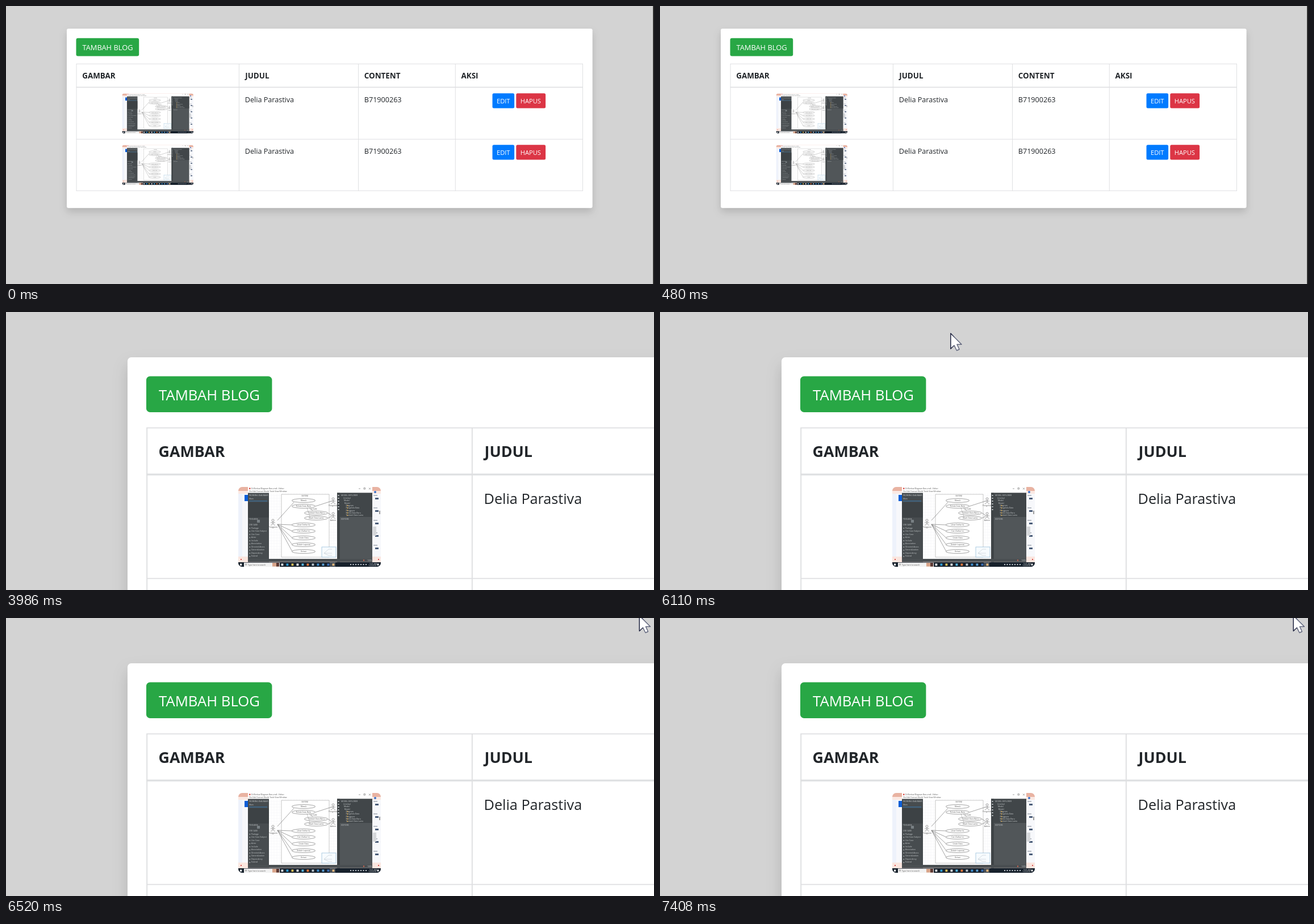
These frames come from a looping animation (1141x491 px, 8000 ms). An HTML page:

```html
<!DOCTYPE html>
<html lang="id">
<head>
<meta charset="utf-8">
<title>Blog</title>
<style>
  html, body { margin: 0; width: 100%; height: 100%; overflow: hidden; background: #d3d3d3; }
  svg { display: block; width: 1141px; height: 491px; }
  text { font-family: "Open Sans", "Noto Sans", sans-serif; fill: #212529; white-space: pre; }
  .th { font-size: 13.4px; font-weight: 700; }
  .td { font-size: 12.6px; }
  .btn { font-size: 12.85px; fill: #fff; }
  .sm { font-size: 11.1px; fill: #fff; }
  .tiny { font-size: 3.4px; fill: #555; }
  .light { fill: #c9cdcf; }
  .mid { text-anchor: middle; }
  .ink { fill: none; stroke: #666; stroke-width: .6; }
</style>
</head>
<body>
<svg viewBox="0 0 1141 491">
  <defs>
    <filter id="shadow" x="-5%" y="-15%" width="110%" height="135%">
      <feDropShadow dx="0" dy="6.7" stdDeviation="6.67" flood-opacity=".15"/>
    </filter>
    <clipPath id="round"><rect x="409" y="309" width="251" height="141" rx="7"/></clipPath>
    <linearGradient id="edge">
      <stop offset=".1" stop-color="#1f2440"/><stop offset=".4" stop-color="#62677e"/>
    </linearGradient>
  </defs>
  <g id="page"></g>
  <path id="cursor" d="M.8 .8V28L7 22L11.5 31L16 29L12 20.3H20Z"
        fill="#fff" stroke="url(#edge)" stroke-width="1.5" stroke-linejoin="round"/>
</svg>
<script>
const page = document.getElementById("page");
const cursor = document.getElementById("cursor");

const rect = (x, y, w, h, fill, r = 0) =>
  `<rect x="${x}" y="${y}" width="${w}" height="${h}" rx="${r}" fill="${fill}"/>`;
const text = (x, y, cls, s) => `<text x="${x}" y="${y}" class="${cls}">${s}</text>`;
const ink = d => `<path class="ink" d="${d}"/>`;
const list = (x, y, step, words) =>
  words.map((w, i) => text(x, y + i * step, "tiny light", w)).join("");

function actor(x, y, label) {
  return `<circle class="ink" cx="${x}" cy="${y}" r="2"/>` +
    ink(`M${x} ${y + 2}v4M${x - 4} ${y + 4}h8M${x - 4} ${y + 9}l4 -3l4 3`) +
    text(x, y + 13, "tiny mid", label);
}

function useCase(x, y, label) {
  return `<ellipse cx="${x}" cy="${y}" rx="20.5" ry="3.5" fill="#fff" stroke="#666" stroke-width=".6"/>` +
    text(x, y + 1.2, "tiny mid", label);
}

// Screenshot thumbnail, drawn at double size
function thumbnail() {
  // browser behind the window
  let s = rect(409, 309, 251, 141, "#f7f8fb") +
    rect(409, 309, 251, 7, "#e9b3a2") + rect(409, 316, 251, 5, "#fbe9e3") +
    rect(409, 321, 7, 111, "#eef2fb") + rect(420, 323, 7, 11, "#0b5ed7") +
    rect(409, 432, 251, 10, "#fae6df") + `<circle cx="650" cy="318" r="2" fill="#3b73c8"/>`;
  for (let y = 323; y < 430; y += 22)
    s += rect(647, y, 7, 2, "#b9bec6") + rect(650, y + 5, 6, 3, "#4a5c78");
  s += rect(646, 379, 6, 16, "#d5d7da") + rect(657, 351, 2, 6, "#9b9b9b") +
    rect(413, 436, 2, 2, "#d9534f") + rect(655, 436, 2, 2, "#d9534f");

  // editor window
  s += rect(426, 309, 219, 132, "#fff") + rect(428, 310.5, 2.5, 2.5, "#d9534f") +
    text(432, 313, "tiny", "D:/Berkas/Diagram Baru.mdl - Editor") +
    text(428, 317.8, "tiny", "File Edit Format Model Tools View Window") +
    ink("M621 312h3M630 310.5h2.5v2.5h-2.5zM639 310.5l3 3M642 310.5l-3 3");
  s += rect(426, 319.5, 37, 122, "#474c4f") + rect(426, 336, 37, 27, "#3d4245") +
    list(428, 325, 6, ["WORKING DIAGRAMS", "Main"]) + rect(428, 333.5, 32, .8, "#3486c9") +
    list(428, 367, 9.5, ["TOOLBOX", "USE CASE"]) + rect(442, 367, 5, 5, "#788084") +
    list(432, 382.5, 5.55, ["Package", "Use Case Subject", "Use Case", "Actor", "Include",
      "Association", "Directed Assoc.", "Generalization", "Dependency", "Extend"]);
  for (let y = 381; y < 436; y += 5.55) s += rect(428.5, y, 1.6, 1.6, "#adb3b5");

  // canvas
  let grid = "";
  for (let x = 467; x < 583; x += 5) grid += `M${x} 320v116`;
  for (let y = 324; y < 436; y += 5) grid += `M463 ${y}h120`;
  s += `<path d="${grid}" stroke="#f2f3f4" stroke-width=".5"/>` +
    `<rect x="485" y="322" width="84" height="111" fill="#fff" stroke="#a0a0a0" stroke-width=".6"/>` +
    text(526, 326, "tiny mid", "SISTEM");
  const rows = [376, 387, 399, 411, 423];
  s += ink("M478 368L507 336M545 343L573 334M567 355L573 359M567 364L573 361" +
    rows.map(y => `M478 375L504 ${y}`).join("")) +
    `<path class="ink" stroke-dasharray="2 1" d="M534 346L541 352M530 346L535 361"/>` +
    text(542, 349, "tiny mid", "include");
  s += useCase(524, 333, "Masuk") + useCase(524, 343, "Kelola Data Baru") +
    useCase(546, 355, "Tambah Data Baru") + useCase(546, 364, "Ubah Data Lama");
  ["Lihat Daftar Isi", "Cari Daftar Isi", "Cetak Data", "Unduh Laporan", "Keluar"]
    .forEach((w, i) => s += useCase(524, rows[i], w));
  s += actor(470, 368, "Pengguna") + actor(576, 330, "Pengelola") + actor(576, 356, "Admin");
  s += `<rect x="556" y="415" width="25" height="18" fill="#f7fbfe" stroke="#8fb9d8" stroke-width=".7"/>` +
    `<path d="M560 426l8-7M560 426l8 0M560 426l8 4M568 419h6M568 426h6M568 430h6" stroke="#bcc8cf" stroke-width=".6"/>`;

  // model explorer and status bar
  s += rect(583, 319.5, 62, 122, "#515659") + rect(583, 319.5, 62, 42.5, "#414649") +
    rect(583, 319.5, 5, 122, "#3f4447") + text(590, 325, "tiny light", "MODEL EXPLORER") +
    list(594, 330, 4.3, ["Untitled", " Model", "  Model", "     Diagram", "     Pengelola Data",
      "     Pengguna", "     Kelola Data Baru", "     Tambah Data Lama"]) +
    text(590, 367, "tiny light", "EDITORS");
  for (let i = 0; i < 6; i++) s += rect(584.5, 323 + i * 5, 2, 2, "#c7cccf");
  for (let i = 0; i < 5; i++) s += rect(600.5, 341 + i * 4.3, 1.8, 1.8, "#d1a34c");
  s += rect(426, 436, 219, 5.5, "#4a4f52") +
    rect(629, 437.5, 2, 2, "#e06b52") + text(636, 440, "tiny light", "100%");

  // taskbar
  s += rect(409, 442, 251, 8, "#17212c") + rect(412, 444.5, 3.2, 3.2, "#fff") +
    rect(419, 442.7, 63, 7.3, "#f2f2f2") + text(426, 447.7, "tiny", "Type here to search") +
    `<circle class="ink" cx="422.5" cy="446" r="1.2"/>` +
    rect(469, 443, 12, 6.5, "#d9a58a") + rect(476, 443, 5, 6.5, "#5d3a35");
  ["#e8eaec", "#2f9fd9", "#e8c35a", "#f0f0f0", "#59b8e8", "#e9783b", "#b9c4cc", "#3f8fd0", "#5a9fd4", "#3b70b8", "#e3a55a"]
    .forEach((c, i) => s += rect(484.5 + i * 9, 444.3, 3.8, 3.8, c));
  s += rect(570, 442, 10, 8, "#ffffff33");
  for (let x = 606; x < 636; x += 4.5) s += rect(x, 445, 2, 2, "#c6ccd1");
  s += text(640, 445.7, "tiny light", "9:41 AM") + text(638, 449.2, "tiny light", "1/2/2030") +
    rect(653.5, 444.5, 3, 3, "#e8eaec");
  return `<g id="thumb" clip-path="url(#round)" transform="scale(.5)">${s}</g>`;
}

function row(y) {
  return text(420.8, y + 169.6, "td", "Delia Parastiva") +
    text(630.8, y + 169.6, "td", "B71900263") +
    rect(856.5, y + 154.2, 38.6, 26.2, "#007bff", 2.5) + text(864, y + 171.9, "sm", "EDIT") +
    rect(898.3, y + 154.2, 51.8, 26.2, "#dc3545", 2.5) + text(905.8, y + 171.9, "sm", "HAPUS");
}

const heads = [[134.3, "GAMBAR"], [421.3, "JUDUL"], [630.8, "CONTENT"], [801.5, "AKSI"]];
page.innerHTML =
  `<g filter="url(#shadow)">${rect(107, 40, 925.6, 316.8, "#fff", 3.3)}</g>` +
  rect(123.5, 56.8, 110.7, 31.7, "#28a745", 3.3) + text(134.5, 77.8, "btn", "TAMBAH BLOG") +
  `<path d="M123.6 102.3H1016M123.6 235.3H1016M123.6 326.3H1016
    M124.1 102V326.7M410.4 102V326.7M620.5 102V326.7M791.3 102V326.7M1015.5 102V326.7"
    stroke="#dedfe1" stroke-width=".95"/>` +
  rect(123.6, 142.7, 892.4, 1.6, "#dedfe1") +
  heads.map(([x, s]) => text(x, 127.9, "th", s)).join("") +
  row(0) + row(91) + thumbnail() + `<use href="#thumb" y="91"/>` +
  rect(1139.4, 0, 1.6, 491, "#111");

// [start ms, x, y]
const stops = [[6110, 511, 37], [6320, 682, 7], [6520, 1114.5, -5]];
const zoomAt = 800, loop = 8000;

function draw(now) {
  const t = now % loop;
  page.setAttribute("transform", `scale(${t < zoomAt ? 1 : 2})`);
  const stop = stops.filter(([start]) => t >= start).pop();
  cursor.setAttribute("visibility", stop ? "visible" : "hidden");
  if (stop) cursor.setAttribute("transform", `translate(${stop[1]} ${stop[2]})`);
}

const begin = performance.now();
function tick() {
  draw(performance.now() - begin);
  requestAnimationFrame(tick);
}
tick();
</script>
</body>
</html>
```
